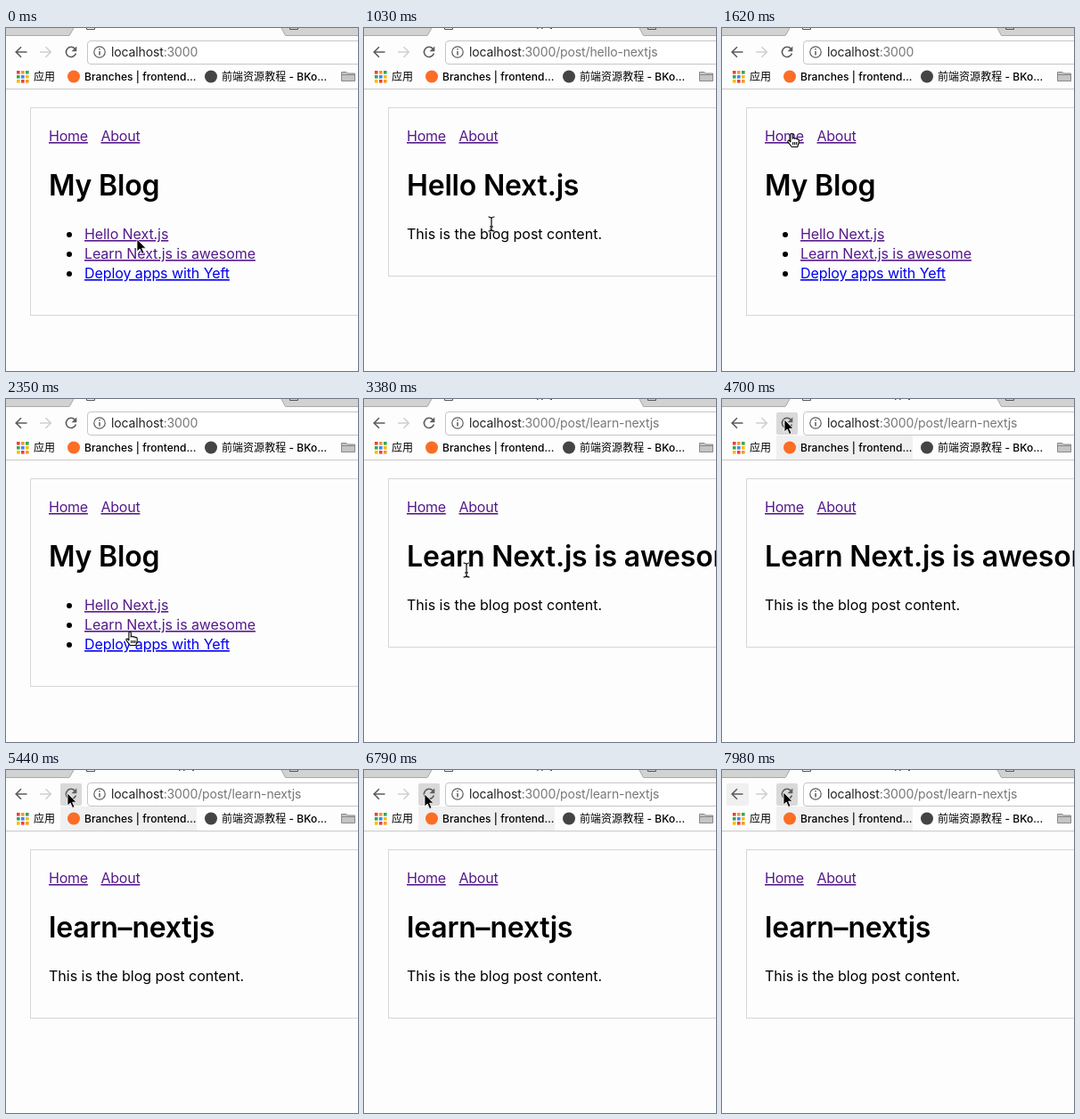
Recreate the animation shown at these times as an HTML page. Size 395x385 px, loop 8 s.

```html
<!DOCTYPE html>
<html lang="en">
<head>
<meta charset="utf-8">
<title>My Blog</title>
<style>
  html, body { margin: 0; width: 100%; height: 100%; overflow: hidden; background: #fdfdfd; }
  svg { display: block; width: 395px; height: 385px; }
  text { font-family: Inter, "Noto Sans CJK SC", "Noto Sans CJK", sans-serif; font-optical-sizing: none; }
  .page text { font-size: 16px; letter-spacing: -.08px; }
  .page .title { font-size: 32px; font-weight: 600; letter-spacing: -.2px; }
  .page .nav { letter-spacing: -.25px; }
  .page #post { letter-spacing: 0; }
  .link { fill: #551a8b; text-decoration: underline; }
  .new { fill: #00e; }
  .marks text { font-size: 12px; font-weight: 500; letter-spacing: .04px; }
  .url { font-size: 14px; fill: #222; letter-spacing: -.13px; }
  #path, .url .port { fill: #777; }
  .icon { fill: none; stroke: #5c5c5c; stroke-width: 1.6; }
  .off { display: none; }
</style>
</head>
<body>
<svg viewBox="0 0 395 385">
  <rect width="395" height="385" fill="#fdfdfd"/>

  <g id="tabs">
    <path d="M0 0H76L72 8H0ZM309 0H395V8H313Z" fill="#d2d2d2"/>
    <path d="M0 8.500H71L76 0M309 0L313.500 8.500H395" fill="none" stroke="#a9a9a9"/>
    <path d="M90.500 0V1.500H99.500V0M318.500 0V1.500H327.500V0" fill="none" stroke="#555"/>
    <path id="tabText" d="M194 0h1.500M199 0h1.500M209 0h2" stroke="#555" stroke-width="2"/>
  </g>

  <rect id="backBg" x="5" y="15" width="25" height="25" rx="2"/>
  <rect id="reloadBg" x="61" y="15" width="24" height="25" rx="2" fill="#d9d9d9"/>
  <rect id="markBg" x="61" y="41" width="153" height="27" fill="#f0f0f0"/>

  <path class="icon" d="M23.500 27H11.500M17 21.200L11.200 27L17 32.800"/>
  <path class="icon" d="M38 27H50M44.500 21.200L50.300 27L44.500 32.800" style="stroke:#d0d0d0"/>
  <g id="reload">
    <path class="icon" d="M77.300 23.300A5.600 5.600 0 1 0 78.400 28.500"/>
    <path d="M79.300 20.500V26.300H73.500Z" fill="#5c5c5c"/>
  </g>
  <path id="stop" class="icon" d="M68 22L78 32M78 22L68 32"/>

  <rect x="91.500" y="14.500" width="320" height="26" rx="3.500" fill="#fff" stroke="#c6c6c6"/>
  <circle cx="105" cy="27" r="6.200" class="icon" style="stroke-width:1.200"/>
  <path d="M105 26V30.500M105 23V24.600" stroke="#5c5c5c" stroke-width="1.500"/>
  <text class="url" x="118" y="32">localhost<tspan class="port">:3000</tspan><tspan id="path"></tspan></text>

  <g class="marks">
    <g id="apps"></g>
    <text x="31" y="59">应用</text>
    <circle cx="76" cy="54.500" r="7" fill="#fc6d26"/>
    <text x="88" y="59">Branches | frontend…</text>
    <circle cx="230" cy="54.500" r="7" fill="#444"/>
    <text x="242" y="59">前端资源教程 - BKo…</text>
    <path d="M376.500 59.500V49.500H382L383.500 51H391.500V59.500ZM376.500 52.500H391.500" fill="#c4c4c4" stroke="#8b8b8b"/>
  </g>
  <path d="M0 68.500H395" stroke="#c9c9c9"/>

  <g class="page">
    <rect id="frame" x="27.500" y="89.500" width="400" fill="none" stroke="#d6d6d6"/>
    <text class="nav link" x="48" y="127">Home</text>
    <text class="nav link" x="106.500" y="127">About</text>
    <text class="title" id="title" x="48" y="188"></text>
    <g id="list">
      <circle cx="71" cy="232" r="3"/>
      <circle cx="71" cy="254" r="3"/>
      <circle cx="71" cy="276" r="3"/>
      <text class="link" x="88" y="237">Hello Next.js</text>
      <text class="link" x="88" y="259">Learn Next.js is awesome</text>
      <text class="link new" x="88" y="281">Deploy apps with Yeft</text>
    </g>
    <text id="post" x="48" y="237">This is the blog post content.</text>
  </g>

  <g id="cursor">
    <path id="arrow" d="M0 0V14L3.200 11L5.600 16.400L8 15.400L5.600 10.200H10Z" stroke="#fff" stroke-width=".8"/>
    <g id="beam" fill="none">
      <path d="M-3.500 -8Q0 -8 0 -6Q0 -8 3.500 -8M0 -6V6M-3.500 8Q0 8 0 6Q0 8 3.500 8M-2 3H2" stroke="#fff" stroke-width="2.600"/>
      <path d="M-3.500 -8Q0 -8 0 -6Q0 -8 3.500 -8M0 -6V6M-3.500 8Q0 8 0 6Q0 8 3.500 8M-2 3H2" stroke="#000" stroke-width="1.200"/>
    </g>
    <path id="hand" transform="translate(-5)" fill="#fff" stroke="#000" stroke-width="1.100" stroke-linejoin="round"
      d="M3.900 1.600C3.900 .1 6.300 .1 6.300 1.600V6.200C6.500 5 8.500 5 8.700 6.400C9 5.400 10.900 5.600 11 7C11.500 6.200 13.200 6.500 13.200 8V11L11.700 15.500H5.300L1 9.800C.2 8.500 1.700 7.600 2.600 8.500L3.900 9.800ZM6.700 10V13M8.700 10V13M10.700 10V13"/>
  </g>
</svg>

<script>
const LOOP = 8000, TICK = 147;
const $ = id => document.getElementById(id);
const show = (id, on) => $(id).classList.toggle('off', !on);

// tick, screen
const screens = [[0, 'home'], [3, 'hello'], [11, 'home'], [18, 'learn'], [35, 'slug']];
const content = {
  home: ['', 'My Blog'],
  hello: ['/post/hello-nextjs', 'Hello Next.js'],
  learn: ['/post/learn-nextjs', 'Learn Next.js is awesome'],
  slug: ['/post/learn-nextjs', 'learn–nextjs']
};

// tick, x, y, pointer
const moves = [
  [0, 147, 237, 'arrow'], [1, 148, 229, 'hand'], [7, 143, 220, 'beam'],
  [8, 91, 112, 'arrow'], [10, 78, 118, 'hand'], [14, 100, 180, 'arrow'],
  [15, 126, 236, 'hand'], [16, 139, 261, 'hand'], [20, 139, 256, 'hand'],
  [23, 115, 192, 'beam'], [24, 107, 160, 'arrow'], [26, 90, 90, 'arrow'],
  [27, 82, 58, 'arrow'], [28, 76, 38, 'arrow'], [29, 71, 27, 'arrow'],
  [30, 70, 23, 'arrow'], [33, 69, 25, 'arrow'], [36, 69, 26, 'arrow'],
  [39, 68, 28, 'arrow'], [46, 68, 27, 'arrow'], [47, 62, 26, 'arrow'],
  [48, 45, 25, 'arrow'], [49, 26, 24, 'arrow'], [50, 15, 25, 'arrow'],
  [52, 40, 26, 'arrow'], [53, 63, 27, 'arrow'], [54, 69, 25, 'arrow']
];

const at = (cues, n) => cues.findLast(cue => cue[0] <= n);

const hues = ['#ea4335', '#f29a2e', '#34a853', '#4285f4', '#fbbc05'];
for (let i = 0; i < 9; i++) {
  const col = i % 3, row = Math.floor(i / 3);
  $('apps').insertAdjacentHTML('beforeend',
    `<rect x="${12 + col * 5}" y="${48 + row * 5}" width="3.600" height="3.600" fill="${hues[(col + 2 * row) % 5]}"/>`);
}

function draw(n) {
  const screen = at(screens, n)[1], home = screen === 'home';
  const [path, title] = content[screen];
  $('path').textContent = path;
  $('title').textContent = title;
  $('frame').setAttribute('height', home ? 233 : 189);
  show('list', home);
  show('post', !home);
  show('tabText', !home);

  const [, x, y, pointer] = at(moves, n);
  $('cursor').setAttribute('transform', `translate(${x} ${y})`);
  for (const id of ['arrow', 'beam', 'hand']) show(id, id === pointer);

  const onBack = n >= 49 && n < 52;
  show('backBg', n >= 49);
  $('backBg').setAttribute('fill', onBack ? '#d9d9d9' : '#f0f0f0');
  show('reloadBg', n >= 29 && (n < 48 || n > 52));
  show('markBg', n >= 27);

  const loading = n >= 33 && n < 36;
  show('reload', !loading);
  show('stop', loading);
}

let last = -1;
function loop() {
  const n = Math.floor((performance.now() % LOOP + 5) / TICK);
  if (n !== last) draw(last = n);
  requestAnimationFrame(loop);
}
loop();
</script>
</body>
</html>
```
